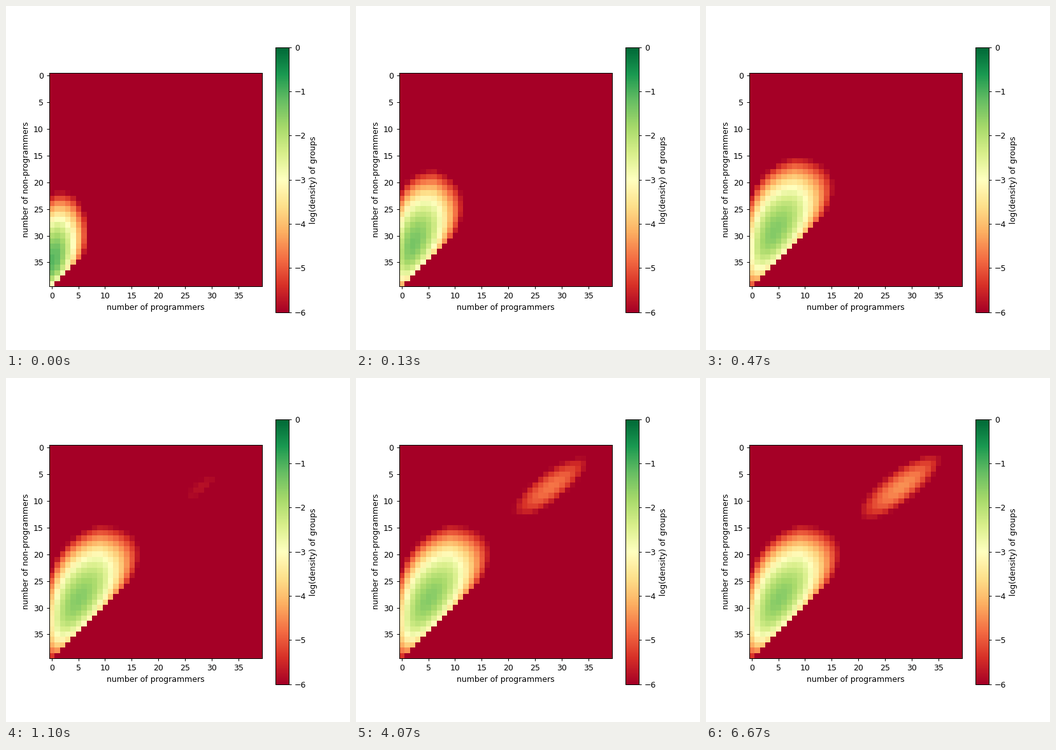
Recreate the animation shown at these times as a matplotlib script. Size 540 px wide and 540 px high, loop 8000 ms.

```python
import numpy as np
import matplotlib.pyplot as plt
from matplotlib.animation import FuncAnimation

SIZE = 40            # largest group size
FLOOR = -6           # lower end of the log scale
FRAMES, STEP = 250, 32

n, p = np.mgrid[0:SIZE, 0:SIZE]   # rows: non-programmers, columns: programmers
total = n + p
allowed = total < SIZE
free = np.where(allowed, SIZE - total, 1)

log_fact = np.concatenate([[0], np.cumsum(np.log10(np.arange(1, SIZE + 1)))])
log_ways = log_fact[SIZE] - log_fact[n] - log_fact[p] - log_fact[free]


def main_mode(t):
    """Log density of the mostly non-programming groups, relaxing to rest."""
    prog = 0.135 - 0.117 * np.exp(-t / 245)
    empty = 0.17 - 0.035 * np.exp(-t / 60)
    log_d = (log_ways + p * np.log10(prog) + free * np.log10(empty)
             + n * np.log10(1 - prog - empty))
    # small groups with many programmers are rarer
    lead = np.maximum(0, p - 3.2 - 43 * prog)
    log_d -= (0.0155 - 0.045 * prog) * lead * free
    # full groups without programmers start out rarer
    return log_d - np.exp(-t / 140 - p / 1.5) * 2.5 ** (1.0 - free)


def coder_mode(t):
    """Log density of the mostly programming groups, leaking in linearly."""
    peak = np.log10(max(6e-9 * (t - 800), 1e-12))
    ridge = p - n - 21.2 - (total - 36)
    off = total - 35.5
    return peak - 0.0099 * ridge**2 - np.where(off < 0, 0.059, 0.095) * off**2


def log_density(t):
    density = 10 ** main_mode(t) + 10 ** coder_mode(t)
    return np.log10(np.where(allowed, np.maximum(density, 10.0**FLOOR), 10.0**FLOOR))


fig, ax = plt.subplots(figsize=(6, 6), dpi=90)
image = ax.imshow(log_density(0), cmap="RdYlGn", vmin=FLOOR, vmax=0,
                  interpolation="nearest")
ax.set_xlabel("number of programmers")
ax.set_ylabel("number of non-programmers")
fig.colorbar(image, ax=ax).set_label("log(density) of groups")


def update(i):
    image.set_data(log_density(i * STEP))
    return [image]


anim = FuncAnimation(fig, update, frames=FRAMES, interval=STEP,
                     repeat=True, repeat_delay=0)
plt.show()
```
